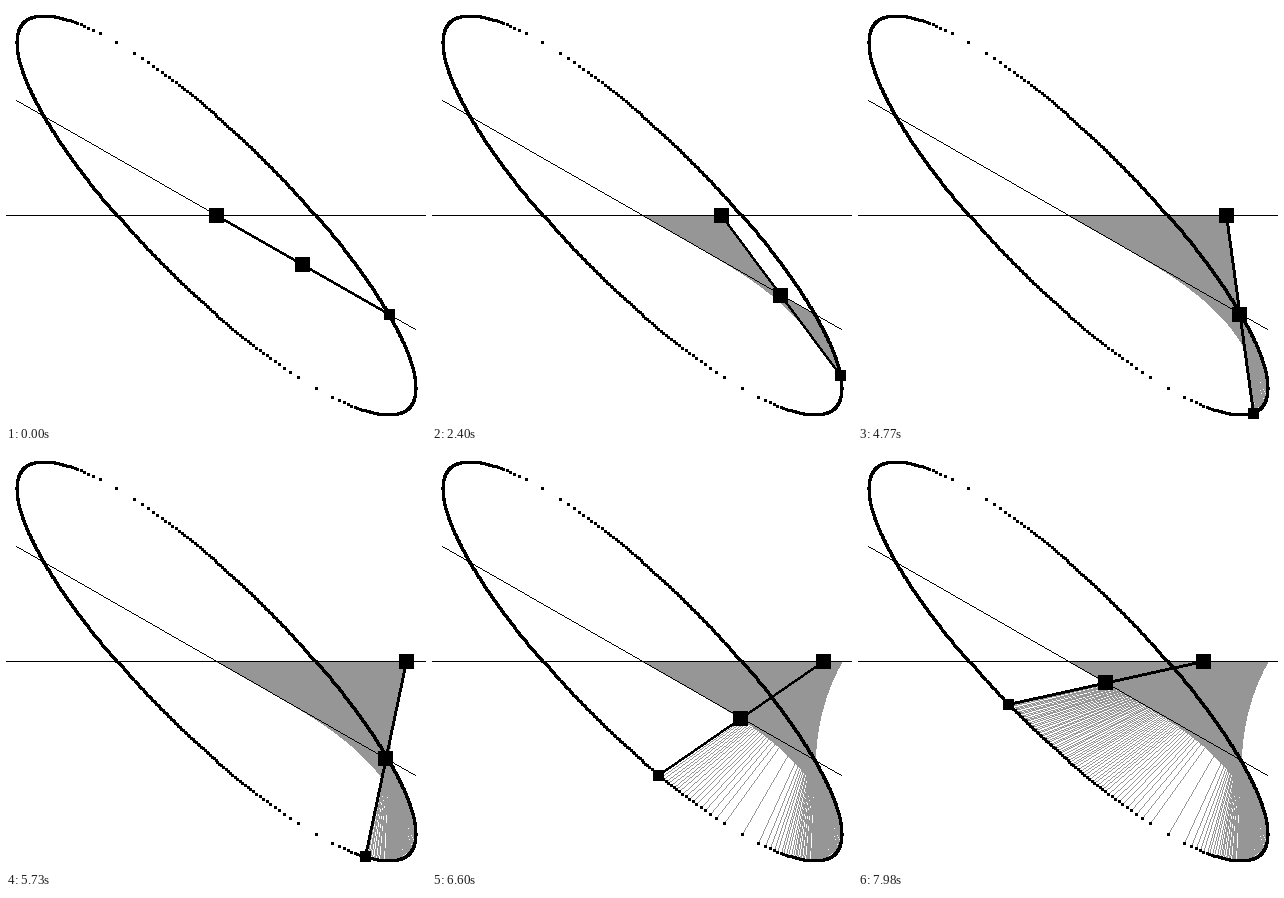
Recreate the animation shown at these times as an HTML page with a canvas. Size 420 by 418 pixels, loop 8000 ms.

```html
<!DOCTYPE html>
<html lang="en">
<head>
<meta charset="utf-8">
<title>Oblique ellipse trammel</title>
<style>
  html, body { margin: 0; width: 100%; height: 100%; overflow: hidden; background: #fff; }
  canvas { display: block; }
</style>
</head>
<body>
<canvas id="stage" width="420" height="418"></canvas>
<script>
const W = 420, H = 418, LOOP = 8000, STEP = 30;
const CX = 210, CY = 209;               // crossing of the two rails
const ARM = 100, TILT = Math.PI / 6;    // half the rod, angle of the slanted rail
const REACH = 200;                      // farthest slide along the level rail
const BLACK = 0xff000000, GREY = 0xff969696, WHITE = 0xffffffff;

const ctx = document.getElementById('stage').getContext('2d');
const image = ctx.createImageData(W, H);
const pixels = new Uint32Array(image.data.buffer);

function plot(x, y, color) {
  if (x >= 0 && x < W && y >= 0 && y < H) pixels[y * W + x] = color;
}

function square(x, y, half) {
  for (let v = -half; v <= half; v++)
    for (let u = -half; u <= half; u++) plot(x + u, y + v, BLACK);
}

// Hard-edged line; thick lines are widened across their minor axis.
function line([x0, y0], [x1, y1], color, thickness = 1) {
  const dx = x1 - x0, dy = y1 - y0;
  const steep = Math.abs(dy) > Math.abs(dx);
  const count = Math.max(Math.abs(dx), Math.abs(dy));
  const width = thickness === 1 ? 1 : Math.floor(thickness * Math.hypot(dx, dy) / count);
  const start = -Math.floor(width / 2);
  for (let i = 0; i <= count; i++) {
    const x = Math.round(x0 + dx * i / count), y = Math.round(y0 + dy * i / count);
    for (let k = start; k < start + width; k++)
      steep ? plot(x + k, y, color) : plot(x, y + k, color);
  }
}

const toStage = (x, y) => [CX + Math.trunc(x), CY + Math.trunc(y)];

// Slider goes out one pixel per step, then back on the other branch.
function pose(i) {
  const out = i <= REACH;
  const a = out ? i : 2 * REACH - i;
  const root = Math.sqrt(Math.max(0, ARM ** 2 - (a * Math.sin(TILT)) ** 2));
  const s = a * Math.cos(TILT) + (out ? root : -root);
  const px = s * Math.cos(TILT), py = s * Math.sin(TILT);
  return {
    slider: toStage(a, 0),
    pivot: toStage(px, py),
    tip: toStage(2 * px - a, 2 * py)
  };
}

const poses = Array.from({ length: 2 * REACH + 1 }, (_, i) => pose(i));

function draw(time) {
  const current = Math.max(0, Math.floor(time / STEP) - 1);
  pixels.fill(WHITE);

  for (let i = 0; i <= current; i++) line(poses[i].slider, poses[i].tip, GREY);

  line([0, CY], [W - 1, CY], BLACK);
  line([10, 94], [409, 323], BLACK);

  for (const { tip: [x, y] } of poses) {
    square(x, y, 1);
    square(2 * CX - x, 2 * CY - y, 1);
  }

  const { slider, pivot, tip } = poses[current];
  line(slider, tip, BLACK, 3);
  square(...slider, 7);
  square(...pivot, 7);
  square(...tip, 5);
  ctx.putImageData(image, 0, 0);
}

const began = performance.now();
function tick() {
  draw((performance.now() - began) % LOOP);
  requestAnimationFrame(tick);
}
tick();
</script>
</body>
</html>
```
